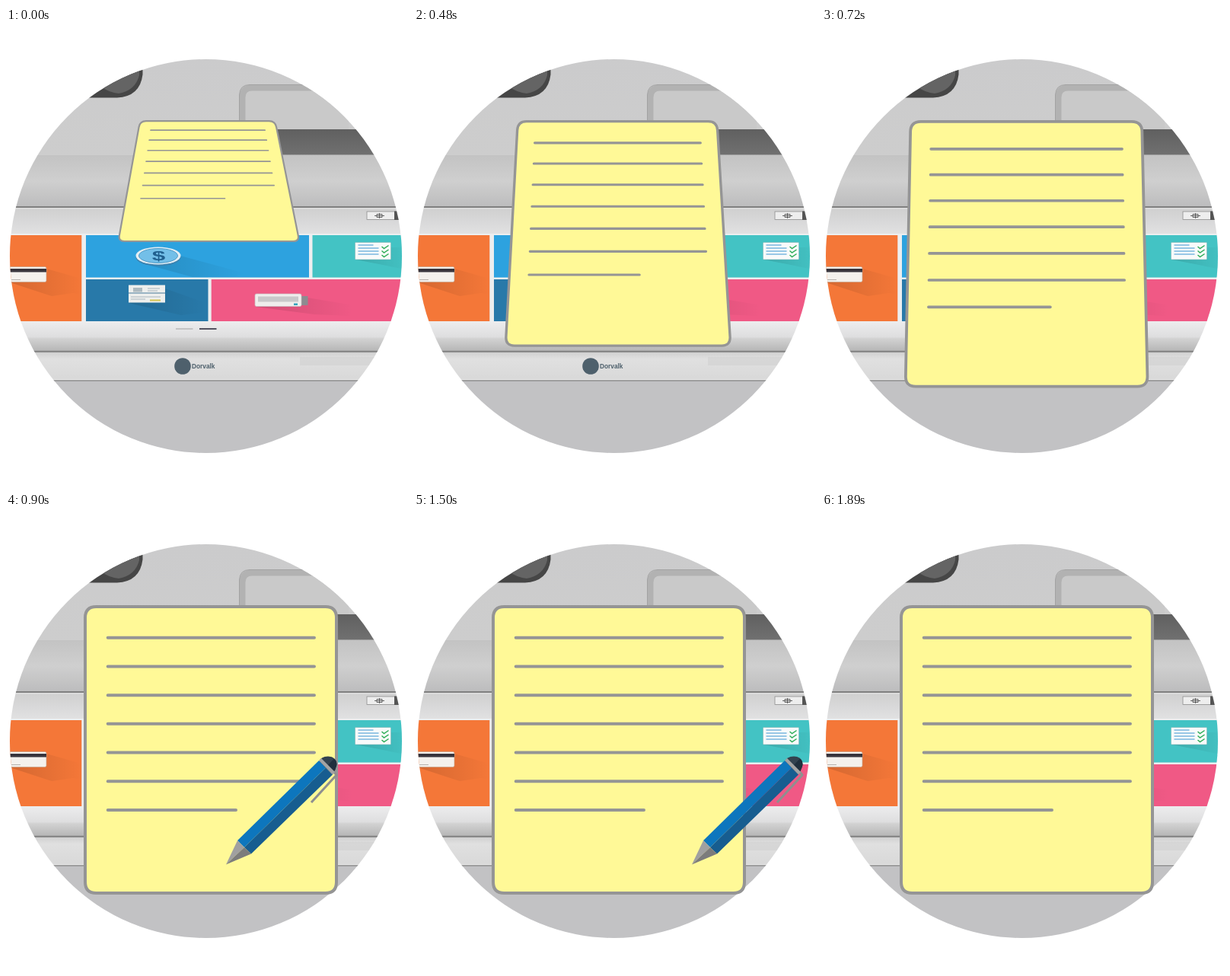
Write an HTML page that moves like this. It is 528 px wide and 600 px high and loops after 2820 ms.

```html
<!DOCTYPE html>
<html lang="en">
<head>
<meta charset="utf-8">
<title>Signing a sheet on a terminal</title>
<style>
  html, body { margin: 0; width: 100%; height: 100%; overflow: hidden; background: #fff; }
  svg { display: block; width: 528px; height: 600px; }
  text { font-family: "Liberation Sans", Arial, sans-serif; font-weight: bold; }
</style>
</head>
<body>
<svg viewBox="0 0 528 600">
  <defs>
    <clipPath id="disc"><ellipse cx="262.500" cy="299.500" rx="257.500" ry="258.500"/></clipPath>
    <linearGradient id="top" x2="0" y2="1"><stop stop-color="#cbcbcc"/><stop offset="1" stop-color="#cdcdcd"/></linearGradient>
    <linearGradient id="slope" x2="0" y2="1"><stop stop-color="#c3c3c3"/><stop offset=".5" stop-color="#cfcfcf"/><stop offset="1" stop-color="#bcbcbd"/></linearGradient>
    <linearGradient id="ledge" x2="0" y2="1"><stop stop-color="#cfcfcf"/><stop offset="1" stop-color="#e2e2e3"/></linearGradient>
    <linearGradient id="lip" x2="0" y2="1"><stop stop-color="#ececed"/><stop offset=".5" stop-color="#dededf"/><stop offset=".56" stop-color="#d2d2d2"/><stop offset="1" stop-color="#b4b4b4"/></linearGradient>
    <linearGradient id="base" x2="0" y2="1"><stop stop-color="#cfcfcf"/><stop offset=".25" stop-color="#e0e0e0"/><stop offset="1" stop-color="#d8d8d8"/></linearGradient>
    <linearGradient id="slot" x2="0" y2="1"><stop stop-color="#606060"/><stop offset="1" stop-color="#707070"/></linearGradient>
    <linearGradient id="shade"><stop stop-opacity=".13"/><stop offset="1" stop-opacity="0"/></linearGradient>
  </defs>

  <g clip-path="url(#disc)">
    <path fill="url(#top)" d="M0 40H528V167H0z"/>
    <path fill="url(#slope)" d="M0 167H528V235H0z"/>
    <path fill="url(#ledge)" d="M0 236H528V272H0z"/>
    <path fill="#eceeef" d="M0 270H528V388H0z"/>
    <path fill="url(#lip)" d="M0 386H528V425H0z"/>
    <path fill="url(#base)" d="M0 425H528V463H0z"/>
    <path fill="#c2c2c4" d="M0 463H528V560H0z"/>
    <path stroke="#808080" stroke-width="2" d="M0 235H528M0 424.700H528"/>
    <path stroke="#8f8f8f" stroke-width="1.500" d="M0 463H528"/>
    <path stroke="#e6e6e6" d="M0 237H528M0 461.500H528"/>
    <path fill="#c8c8c8" opacity=".4" d="M386 432H490V443H386z"/>

    <!-- Camera corner and slot panel -->
    <path fill="#464646" d="M90 40H179.500V61Q176 90 146 91.500H90z"/>
    <path fill="#646464" d="M124 40H175V62Q170 82 148 86Q133 84 124 76z"/>
    <path fill="#c9c9c9" d="M310 140V88Q310 78 321 78H450V140z"/>
    <path fill="none" stroke="#b2b2b2" stroke-width="8" d="M310.500 140V91Q310.500 78.500 323 78.500H450"/>
    <path fill="none" stroke="#a2a2a2" d="M306.500 140V88Q307 74.500 320 74.500H450"/>
    <path fill="url(#slot)" d="M340 133H528V166.500H340z"/>

    <!-- Small socket -->
    <rect x="474" y="241" width="46" height="10.500" fill="#eee" stroke="#8e8e8e" stroke-width=".8"/>
    <path fill="none" stroke="#555" stroke-width=".9" d="M484 246.500H497M487 244.500H494V248.500H487zM490.500 243V250"/>
    <path fill="#555" d="M510 240.500H521V252H510z"/>

    <!-- Tiles -->
    <path fill="#f47738" d="M0 272H99.300V385H0z"/>
    <path fill="#2da2df" d="M105 272H398V327.500H105z"/>
    <path fill="#43c3c4" d="M402.500 272H528V327.500H402.500z"/>
    <path fill="#2879a9" d="M105 330H265.500V385H105z"/>
    <path fill="#f05985" d="M269.700 330H528V385H269.700z"/>
    <g fill="url(#shade)">
      <path d="M5 334L53 316L99 329V350L88 348L60 352z"/>
      <path d="M183 310L229 299L314 322L300 327H245z"/>
      <path d="M161 361L209 342L262 361V373L230 377z"/>
      <path d="M328 366L396 354L456 364L452 378L405 376z"/>
      <path d="M459 304L506 288H528V318L500 312z"/>
    </g>

    <!-- Bank card -->
    <rect x="-8" y="313.500" width="61" height="20" rx="2" fill="#f4f1ed" stroke="#c9a78f" stroke-width=".7"/>
    <path fill="#38343c" d="M0 316H53V320.500H0z"/>
    <path stroke="#b6b2ae" d="M5 330.500H19"/>

    <!-- Coin -->
    <ellipse cx="200" cy="301" rx="29.500" ry="11.500" fill="#3c83b0"/>
    <ellipse cx="200" cy="299" rx="29.500" ry="11.500" fill="#e3eef4"/>
    <ellipse cx="200" cy="299" rx="25.500" ry="9.500" fill="#73bfe8" stroke="#519bc7"/>
    <text font-size="17" fill="#205f8e" text-anchor="middle" transform="translate(200.500 304.700) scale(1.850 1)">$</text>

    <!-- Slips -->
    <g transform="translate(0 -.5)">
      <path fill="#eeefed" d="M161 338H209V348H161zM161 349H209V361H161z"/>
      <path stroke="#aab6bd" stroke-width="1.200" d="M161 348.500H209M186 342.500H202M186 345.500H199M164 353.500H203M164 356.500H183"/>
      <path fill="#aebac0" d="M167 341.500H179V347H167z"/>
      <path stroke="#d5c34e" stroke-width="2" d="M189 358H203"/>
    </g>

    <!-- Memory stick -->
    <path fill="#8d8b90" d="M386 352H396.500V364H386z"/>
    <rect x="327" y="349" width="61" height="16.500" rx="2" fill="#efeeec" stroke="#c7b8bd" stroke-width=".7"/>
    <path fill="#c9c9ca" d="M331 352.500H384V359.500H331z"/>
    <path fill="#33a4bd" d="M378 361.500H383V364H378z"/>

    <!-- Checklist -->
    <g transform="translate(-.5 -.5)">
      <rect x="459" y="282" width="47" height="22.500" rx="1" fill="#f8fafa" stroke="#86b5b5" stroke-width=".6"/>
      <path stroke="#79b6df" stroke-width="1.300" d="M463 285.500H483M463 289.500H490M463 293.500H490M463 297.500H490"/>
      <path fill="none" stroke="#2fae58" stroke-width="1.500" d="M494 287.500l3 2.500 6-4M494 293l3 2.500 6-4M494 298.500l3 2.500 6-4"/>
    </g>

    <path stroke="#b9b9b9" stroke-width="1.500" d="M223 395H245.500"/>
    <path stroke="#525260" stroke-width="1.800" d="M254 395H276.500"/>
    <circle cx="232" cy="444" r="10.800" fill="#4e606c"/>
    <text x="244" y="447" font-size="8.300" fill="#4e606c">Dorvalk</text>
  </g>

  <path id="sheet" fill="#fff997" stroke="#959595"/>
  <path id="rules" fill="none" stroke="#959595" stroke-linecap="round"/>

  <g id="pen">
    <path fill="none" stroke="#8f8f8f" stroke-width="3" stroke-linejoin="round" d="M426 334L434 344L401 380"/>
    <path fill="#33424f" d="M411 327Q413 319.500 423 319.500Q434 320 434.500 330Q433 337 429 343z"/>
    <path fill="#202f3d" d="M420 334L431 322.500Q434.500 325 434.500 331Q433 337 429 343z"/>
    <path fill="#0d76bd" d="M304 430L411 325L420 334.500L313 439z"/>
    <path fill="#175d90" d="M313 439L420 334.500L429 343.500L322 447.500z"/>
    <path fill="#a4a4a4" d="M411 325L414 322L432 340L429 343.500z"/>
    <path fill="#a0a0a0" d="M289 461.500L304 430L313 439z"/>
    <path fill="#7c7c7c" d="M289 461.500L313 439L322 447.500z"/>
  </g>
</svg>

<script>
const LOOP = 2820, STEP = 30, OPEN_END = 870, PEN_ON = 900, PEN_OFF = 1890;
const PEN_PATH = [[900, 0], [1080, 29], [1500, 76], [1620, 90], [1860, 120]];
const [sheet, rules, pen] = ["sheet", "rules", "pen"].map(id => document.getElementById(id));
const mix = (a, b, f) => a + (b - a) * f;
const fmt = p => p.map(n => n.toFixed(2)).join(" ");

// Point at a given distance from a towards b
function towards(a, b, dist) {
  const f = dist / Math.hypot(b[0] - a[0], b[1] - a[1]);
  return [mix(a[0], b[0], f), mix(a[1], b[1], f)];
}

function roundedPath(pts, r) {
  return pts.map((p, i) => {
    const prev = pts[(i + 3) % 4], next = pts[(i + 1) % 4];
    return `${i ? "L" : "M"}${fmt(towards(p, prev, r))}Q${fmt(p)} ${fmt(towards(p, next, r))}`;
  }).join("") + "z";
}

function drawSheet(t) {
  const f = Math.min(t / OPEN_END, 1);
  const near = f + 0.3 * f * (1 - f); // the lower edge eases out slightly
  const thick = Math.pow(f, 0.75);
  const width = mix(2.2, 4, thick);
  const top = 121 + width / 2;
  const bottom = mix(280, 499, near);
  const tl = mix(176, 104, f), tr = mix(353.5, 434, f);
  const bl = mix(147.5, 104, near), br = mix(385.3, 434, near);
  const depth = (tr - tl) / (br - bl);
  const pageTop = top - mix(1.2, 0.3, f);

  sheet.setAttribute("d", roundedPath([[tl, top], [tr, top], [br, bottom], [bl, bottom]], mix(8, 14.5, f)));
  sheet.setAttribute("stroke-width", width);

  const at = (u, v) => {
    const w = v * depth / (1 - (1 - depth) * v);
    return [mix(mix(tl, bl, w), mix(tr, br, w), u), mix(pageTop, bottom, w)];
  };
  let d = "";
  for (let i = 0; i < 7; i++) {
    const v = 0.109 + i * 0.1002;
    d += `M${fmt(at(0.09, v))}L${fmt(at(i < 6 ? 0.912 : 0.6, v))}`;
  }
  rules.setAttribute("d", d);
  rules.setAttribute("stroke-width", mix(1.7, 4, thick));
}

function penShift(t) {
  const i = PEN_PATH.findIndex(([end], n) => n && t <= end);
  if (i < 0) return PEN_PATH[PEN_PATH.length - 1][1];
  const [t0, x0] = PEN_PATH[i - 1], [t1, x1] = PEN_PATH[i];
  return mix(x0, x1, (t - t0) / (t1 - t0));
}

function drawPen(t) {
  const shown = t >= PEN_ON && t < PEN_OFF;
  pen.setAttribute("visibility", shown ? "visible" : "hidden");
  if (shown) pen.setAttribute("transform", `translate(${penShift(t).toFixed(2)} 0)`);
}

const start = performance.now();
function render() {
  const t = Math.floor((performance.now() - start) % LOOP / STEP) * STEP;
  drawSheet(t);
  drawPen(t);
  requestAnimationFrame(render);
}
render();
</script>
</body>
</html>
```
